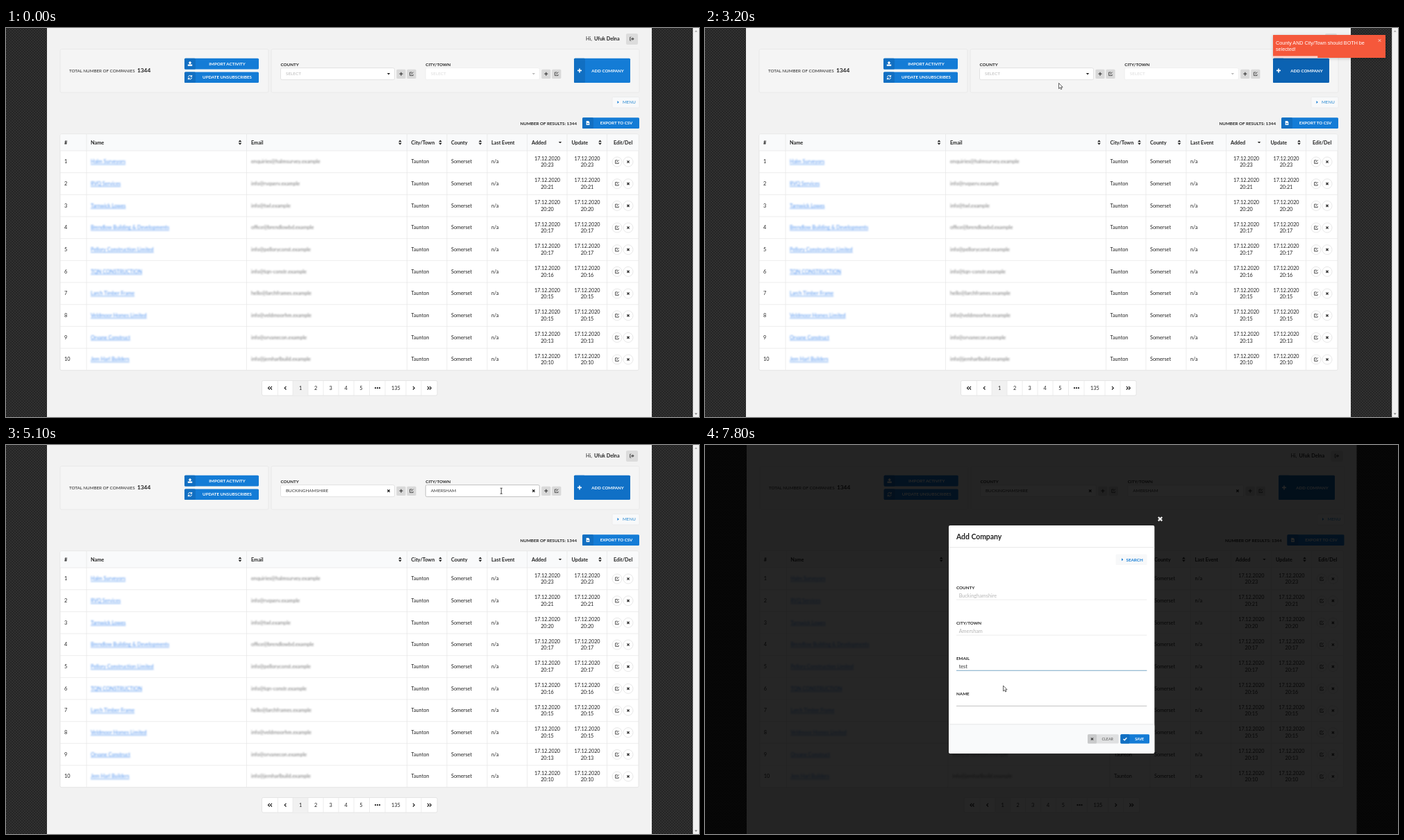
An HTML page that plays this animation: 998 px wide and 561 px high, repeating every 8 s.

```html
<!DOCTYPE html>
<html lang="en">
<head>
<meta charset="utf-8">
<title>Company list</title>
<style>
html, body { margin: 0; width: 100%; height: 100%; overflow: hidden; background: #f2f2f2; }
svg { display: block; width: 100%; height: 100%; font-family: Lato, "Open Sans", sans-serif; }
</style>
</head>
<body>
<svg viewBox="0 0 998 561" xmlns="http://www.w3.org/2000/svg">
  <defs>
    <pattern id="weave" width="4" height="4" patternUnits="userSpaceOnUse">
      <rect width="4" height="4" fill="#2b2b2b"/>
      <path d="M0 0h2v1h-2zM2 2h2v1h-2z" fill="#1f1f1f"/>
      <path d="M0 1h2v1h-2zM2 3h2v1h-2z" fill="#373737"/>
    </pattern>
    <filter id="soft"><feGaussianBlur stdDeviation="1.3"/></filter>
    <filter id="shade" x="-10%" y="-20%" width="120%" height="150%">
      <feDropShadow dx="0" dy="1" stdDeviation="2" flood-opacity=".2"/>
    </filter>
  </defs>
  <g id="main">
    <g id="page"></g>
    <g id="form"></g>
    <g id="toast"></g>
    <g id="bar"></g>
  </g>
  <g id="modal"></g>
  <g id="email"></g>
  <g id="pointer">
    <path id="arrow" d="M0 0V8L1.9 6.3L3.1 9L4.4 8.4L3.2 5.8H5.6Z" fill="#fff" stroke="#222" stroke-width=".7"/>
    <path id="beam" d="M-1.6-4H1.6M0-4V4M-1.6 4H1.6" fill="none" stroke="#222" stroke-width=".8"/>
  </g>
</svg>
<script>
const LOOP = 8000, STEP = 100;
const BLUE = '#147cd6', BLUE_SIDE = '#116fc2', LINE = '#e6e6e6', INK = '#222';
const $ = id => document.getElementById(id);

// Drawing helpers; text is placed by the middle of its capitals.
const text = (x, y, s, { z = 7.28, c = INK, a = 'start', b = 0, more = '' } = {}) =>
  `<text x="${x}" y="${y + z * .36}" font-size="${z}" fill="${c}" text-anchor="${a}" font-weight="${b ? 700 : 400}" ${more}>${s}</text>`;
const caps = (x, y, s, o = {}) => text(x, y, s, { z: 6.24, ...o });
const rect = (x, y, w, h, fill, stroke = 'none', r = 0) =>
  `<rect x="${x}" y="${y}" width="${w}" height="${h}" fill="${fill}" stroke="${stroke}" stroke-width=".7" rx="${r}"/>`;
const line = (x1, y1, x2, y2, c = LINE, w = .7) =>
  `<path d="M${x1} ${y1}L${x2} ${y2}" stroke="${c}" stroke-width="${w}"/>`;
const stroke = (x, y, d, c = INK, w = 1) =>
  `<path transform="translate(${x} ${y})" d="${d}" fill="none" stroke="${c}" stroke-width="${w}"/>`;
const solid = (x, y, d, c = INK) => `<path transform="translate(${x} ${y})" d="${d}" fill="${c}"/>`;

const DOWN = 'M-2.2-1.1H2.2L0 1.3Z', RIGHT = 'M-1-2L1.3 0L-1 2Z';
const SORT = 'M-2.3-.7H2.3L0-3.5ZM-2.3.8H2.3L0 3.6Z';
const PLUS = 'M-2.5 0H2.5M0-2.5V2.5';
const EDIT = 'M.8-2.2H-2.4V2.4H2.2V.7M-.7 .8L2.7-2.6';
const UPLOAD = 'M-3.2 1H3.2V3.2H-3.2ZM-1 .5V-1H-2.6L0-3.6L2.6-1H1V.5Z';
const REFRESH = 'M-2.6-.5A2.7 2.7 0 0 1 2.2-1.6M2.6-3.2V-1H.4M2.6.5A2.7 2.7 0 0 1-2.2 1.6M-2.6 3.2V1H-.4';
const SHEET = 'M-2.3-3H.8L2.3-1.5V3H-2.3ZM-1.2 0V.6H1.2V0ZM-1.2 1.3V1.9H1.2V1.3Z';
const CHECK = 'M-2.4 0L-.7 1.7L2.4-1.6';
const cross = (x, y, r, c = INK, w = 1.3) => stroke(x, y, `M${-r} ${-r}L${r} ${r}M${r} ${-r}L${-r} ${r}`, c, w);

function button(x, y, w, h, side, label, icon, o = {}) {
  const { fill = BLUE, dark = BLUE_SIDE, c = '#fff', z = 6.15 } = o;
  return rect(x, y, w, h, fill, 'none', 1.5) + rect(x, y, side, h, dark, 'none', 1.5) +
    icon(x + side / 2, y + h / 2) +
    caps(x + side + (w - side) / 2, y + h / 2, label, { c, z, a: 'middle', b: 1 });
}

const COLS = [116, 346.5, 577.5, 635, 693, 750.5, 808, 865.5];
const HEADS = [[84, '#'], [122, 'Name', 337], [353, 'Email', 567.5], [583.5, 'City/Town', 625.5], [641, 'County', 683],
  [699, 'Last Event'], [757, 'Added', 798], [814.5, 'Update', 855.5], [875, 'Edit/Del']];
const NAMES = ['Halm Surveyors', 'RVQ Services', 'Tarnwick Lowes', 'Brendlow Building &amp; Developments',
  'Pellory Construction Limited', 'TQN CONSTRUCTION', 'Larch Timber Frame', 'Veldmoor Homes Limited',
  'Orvane Construct', 'Jem Harl Builders'];
const MAILS = ['enquiries@halmsurvey.example', 'info@rvqserv.example', 'info@twl.example', 'office@brendlowbd.example',
  'info@pelloryconst.example', 'info@tqn-constr.example', 'hello@larchframes.example', 'info@veldmoorhm.example',
  'info@orvanecon.example', 'info@jemharlbuild.example'];
const TIMES = ['23', '21', '20', '17', '17', '16', '15', '15', '13', '10'];
const ROW = 31.67, TOP = 177;

// k = 1 lays the page out for the wider window without a scroll bar.
const shiftTable = k => x => x + k * (.8 + (x - 78) / 833 * 7.7);
const shiftForm = k => x => x + k * (1 + (x - 395) / 423 * 7);

function table(k) {
  const X = shiftTable(k), left = X(78), right = X(911), bottom = TOP + ROW * 10;
  let s = rect(left, 153, right - left, bottom - 153, '#fff', '#dedede', 2) +
    rect(left + .4, 153.4, right - left - .8, 23.6, '#f9fafb');
  let names = '', mails = '';
  COLS.forEach(x => s += line(X(x), 153, X(x), bottom));
  HEADS.forEach(([x, label, icon]) => {
    s += text(X(x), 165, label, { b: 1 });
    if (icon) s += solid(X(icon), 165, label === 'Added' ? DOWN : SORT);
  });
  TIMES.forEach((min, i) => {
    const y0 = TOP + ROW * i, y = y0 + 15.8;
    s += line(left, y0, right, y0) + text(X(84), y, i + 1) + text(X(583.5), y, 'Taunton') +
      text(X(641), y, 'Somerset') + text(X(699), y, 'n/a');
    [779.5, 837].forEach(x => s += text(X(x), y - 4.8, '17.12.2020', { a: 'middle' }) +
      text(X(x), y + 4.8, '20:' + min, { a: 'middle' }));
    [880, 896].forEach(x => s += `<circle cx="${X(x)}" cy="${y + .2}" r="7" fill="#fff" stroke="#ddd" stroke-width=".7"/>`);
    s += stroke(X(880), y + .2, EDIT, '#444', .9) + cross(X(896), y + .2, 1.6, '#333');
    names += text(X(122), y, NAMES[i], { c: '#4d90ee', more: 'text-decoration="underline"' });
    mails += text(X(353), y, MAILS[i], { c: '#777' });
  });
  return s + `<g filter="url(#soft)">${names}</g><g filter="url(#soft)">${mails}</g>`;
}

function pager(k) {
  const d = k * 4.5;
  let s = rect(368.5 + d, 508.5, 252.5, 21.5, '#fff', '#ddd', 2) + rect(413 + d, 509, 22, 20.6, '#f1f1f1');
  [391.5, 413, 435, 457, 479, 501, 523.5, 546, 576, 598].forEach(x => s += line(x + d, 508.5, x + d, 530));
  [[424, 1], [446, 2], [467.7, 3], [489.5, 4], [511.3, 5], [561.3, 135]].forEach(([x, n]) =>
    s += text(x + d, 519.2, n, { a: 'middle' }));
  const L = 'M1-2.3L-1.3 0L1 2.3', R = 'M-1-2.3L1.3 0L-1 2.3';
  [[378.8, L], [382, L], [402.5, L], [587, R], [607.8, R], [611, R]].forEach(([x, p]) => s += stroke(x + d, 519.2, p, INK, 1.2));
  [532, 535, 538].forEach(x => s += `<circle cx="${x + d}" cy="519.2" r="1.1" fill="${INK}"/>`);
  return s;
}

function page(k) {
  const r = k * 8.5, edge = 930 + r, end = 912 + r;
  return rect(0, 0, 998, 561, '#f2f2f2') + rect(0, 0, 59 + k, 561, 'url(#weave)') +
    rect(edge, 0, 59.5, 561, 'url(#weave)') +
    text(835 + r, 15.5, 'Hi,') + text(847 + r, 15.5, 'Ufuk Delna', { b: 1 }) +
    rect(893 + r, 8, 17, 16, '#dcdcdc', 'none', 2) +
    stroke(901.5 + r, 15.7, 'M-1-2.4H-3V2.4H-1', '#555', .9) + solid(901.5 + r, 15.7, 'M-1.8-.8H.5V-2.4L3.2 0L.5 2.4V.8H-1.8Z', '#555') +
    rect(78 + k, 30.5, 300, 62.5, '#f5f5f5', LINE, 2) + rect(382 + k, 30.5, 530 + k * 7.5, 62.5, '#f5f5f5', LINE, 2) +
    caps(91 + k, 61.7, 'TOTAL NUMBER OF COMPANIES') + text(189 + k, 61.5, '1344', { z: 8.3, b: 1 }) +
    button(257 + k * .7, 43.8, 107, 15.6, 16, 'IMPORT ACTIVITY', (x, y) => solid(x, y, UPLOAD, '#fff')) +
    button(257 + k * .7, 63.4, 107, 15.6, 16, 'UPDATE UNSUBSCRIBES', (x, y) => stroke(x, y, REFRESH, '#fff')) +
    rect(873 + r, 99.5, 39, 15.5, '#f8f9fa', '#e8e8e8', 1.5) + solid(881.5 + r, 107, RIGHT, BLUE) +
    caps(888 + r, 107.2, 'MENU', { c: '#2185d0' }) +
    caps(822 + r, 137.3, 'NUMBER OF RESULTS: 1344', { a: 'end', b: 1 }) +
    button(end - 82, 129.2, 82, 15.8, 16, 'EXPORT TO CSV', (x, y) => solid(x, y, SHEET, '#fff')) +
    table(k) + pager(k);
}

function field(P, x, label, value, o) {
  const x0 = P(x), w = P(x + 164) - x0, mid = 66.2;
  let s = caps(x0, 53, label, { b: 1 }) + rect(x0, 57.6, w, 17, '#fff', o.border, 2) +
    caps(x0 + 7.5, mid, value || 'SELECT', { z: 6.35, c: value ? '#333' : o.hint });
  s += value ? cross(x0 + w - 8.5, mid, 1.7) : solid(x0 + w - 8.5, mid, DOWN, o.caret);
  if (o.cursor) s += line(x0 + 7.4, 62, x0 + 7.4, 70.5, '#111', .8);
  [[173.5, PLUS, 1.3], [188.5, EDIT, .9]].forEach(([dx, d, wd]) => {
    const cx = P(x + dx);
    s += rect(cx - 6.6, 59.7, 13.2, 13.2, '#d9d9d9', 'none', 1.5) + stroke(cx, mid, d, '#444', wd);
  });
  return s;
}

function form(k, st) {
  const P = shiftForm(k);
  const open = st.county ? { hint: '#c8c8c8', caret: '#444', border: st.cityFocus ? '#aaa' : '#d9d9d9' }
    : { hint: '#dcdcdc', caret: '#bbb', border: '#ebebeb' };
  return field(P, 395.5, 'COUNTY', st.county, { hint: '#b8b8b8', caret: INK, border: '#d9d9d9', cursor: st.caret }) +
    field(P, 604.3, 'CITY/TOWN', st.city, open) +
    button(P(818), 43.8, 81, 35.2, 16, 'ADD COMPANY', (x, y) => stroke(x, y, 'M-3 0H3M0-3V3', '#fff', 1.6),
      { fill: st.add, dark: st.add === BLUE ? BLUE_SIDE : st.add });
}

function modal() {
  let s = rect(0, 0, 998, 561, 'rgba(0,0,0,.85)') + cross(655.5, 106.7, 2.7, '#eee', 2.3) +
    rect(351, 116, 296.3, 328.8, '#fff', 'none', 2) + rect(351, 402.8, 296.3, 42, '#f9fafb', 'none', 2) +
    line(351, 147.7, 647.3, 147.7, '#dedede') + line(351, 402.8, 647.3, 402.8, '#dedede') +
    text(362, 132, 'Add Company', { z: 10.4, b: 1 }) +
    rect(591.5, 157.5, 45, 15.5, '#f7f8f9', 'none', 1.5) + solid(601, 165.2, RIGHT, BLUE) +
    caps(606.5, 165.4, 'SEARCH', { c: BLUE, b: 1 });
  [['COUNTY', 'Buckinghamshire'], ['CITY/TOWN', 'Amersham'], ['EMAIL'], ['NAME']].forEach(([label, value], i) => {
    const y = 205.3 + i * 51.1;
    s += caps(362, y, label, { b: 1 }) + line(362, y + 17.8, 636.3, y + 17.8, value ? '#e6e6e6' : '#bbb', value ? .7 : .9);
    if (value) s += text(365.7, y + 12.2, value, { c: '#b5b5b5' });
  });
  return s + button(551, 417.3, 44.6, 13.3, 13, 'CLEAR', (x, y) => cross(x, y, 1.6, '#444'),
      { fill: '#dfe0e1', dark: '#c9cacb', c: '#777', z: 5.3 }) +
    button(598.4, 417.3, 41.6, 13.3, 13, 'SAVE', (x, y) => stroke(x, y, CHECK, '#fff', 1.4), { z: 5.3 });
}

function toast() {
  const font = 'font-family="Liberation Sans, Arial, sans-serif"';
  const say = (y, s) => text(822, y, s, { z: 7.2, c: '#fff', more: font });
  return `<g filter="url(#shade)">${rect(818, 10, 162, 33, '#f5593a', 'none', .5)}</g>` +
    say(21.2, 'County AND City/Town should BOTH be') + say(30.8, 'selected!') +
    cross(971.5, 18, 1.8, '#fbd0c6', 1) +
    '<rect id="left" x="818" y="40.4" height="2.6" fill="#fff" fill-opacity=".75"/>';
}

// Linear lookup in rows of [time, ...values].
function at(keys, t) {
  const i = keys.findIndex(r => r[0] > t);
  if (i === 0) return keys[0].slice(1);
  if (i < 0) return keys[keys.length - 1].slice(1);
  const a = keys[i - 1], b = keys[i], p = (t - a[0]) / (b[0] - a[0]);
  return a.slice(1).map((v, j) => v + (b[j + 1] - v) * p);
}

const PATH = [[600, 790, 330], [1000, 861, 54], [1900, 860, 49.5], [2300, 858, 52], [2800, 640, 92], [3200, 509.5, 79.5],
  [3500, 470, 67], [4000, 470, 67], [4400, 664, 68.3], [5000, 664, 68.3], [5400, 861, 60], [5600, 861, 60],
  [5800, 511.5, 309.7], [5900, 451, 350.7], [6200, 412, 320], [7200, 412, 320], [7500, 430, 357], [7800, 429.5, 347]];
const SLIDE = [[1150, 400], [1400, 60], [1600, -13], [1712, 5], [1825, -2.6], [1900, 0],
  [4390, 0], [4440, -8], [4500, 14], [4600, 300]];

const show = (el, on) => el.style.display = on ? '' : 'none';
const KEYS_DOWN = [6900, 7000, 7100, 7300];
const DARK = '#0b62b2';
let drawn = '';

function addColour(t) {
  if (t < 1000) return BLUE;
  if (t < 3500) return DARK;
  if (t < 5300) return '#1070c6';
  return '#1061ab';
}

function drawEmail(t) {
  const typed = 'test'.slice(0, KEYS_DOWN.filter(k => t >= k).length);
  const tail = t >= 6400 && t < 7750
    ? '<tspan font-weight="400" fill="#333" dx="-.4">|</tspan>' : '';
  $('email').innerHTML = t < 6400 ? '' :
    line(362, 325.3, 636.3, 325.3, '#85b7d9', .9) + text(365.7, 319.7, typed + tail, { c: '#333' });
}

function draw(t) {
  const inModal = t >= 5900;
  show($('main'), !inModal);
  show($('modal'), inModal);
  drawEmail(t);

  const state = {
    county: t >= 4000 ? 'BUCKINGHAMSHIRE' : '', city: t >= 5100 ? 'AMERSHAM' : '',
    caret: t >= 4000 && t < 4600, cityFocus: t >= 4300 && t < 5300, add: addColour(t)
  };
  const key = JSON.stringify(state);
  if (key !== drawn) $('form').innerHTML = form(0, state);
  drawn = key;

  show($('toast'), t >= 1150 && t < 4600);
  $('toast').setAttribute('transform', `translate(${at(SLIDE, t)[0]} 0)`);
  $('left').setAttribute('width', 162 * Math.max(0, Math.min(1, 1 - (t - 1390) / 3000)));

  const [x, y] = at(PATH, t);
  const inField = inModal ? y > 313 && y < 325
    : y > 57 && y < 75 && (x > 395 && x < 548 || x > 604 && x < 757);
  show($('pointer'), t >= 600);
  $('pointer').setAttribute('transform', `translate(${x} ${y})`);
  show($('arrow'), !inField);
  show($('beam'), inField);
}

$('page').innerHTML = page(0);
$('toast').innerHTML = toast();
$('bar').innerHTML = rect(989.4, 0, 9, 561, '#f1f1f1') + solid(993.7, 4.6, 'M-2 1H2L0-1.2Z', '#999') +
  solid(993.7, 556.6, 'M-2-1H2L0 1.2Z', '#777');
$('modal').innerHTML = page(1) +
  form(1, { county: 'BUCKINGHAMSHIRE', city: 'AMERSHAM', add: DARK }) + modal();

const start = performance.now();
function tick() {
  const t = (performance.now() - start) % LOOP;
  draw(Math.min(7800, Math.floor(t / STEP) * STEP));
  requestAnimationFrame(tick);
}
tick();
</script>
</body>
</html>
```
